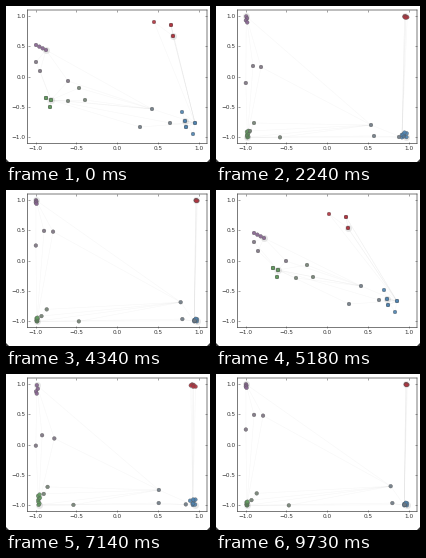
Recreate the animation shown at these times as a matplotlib script. Size 204 by 156 pixels, loop 9.8 s.

```python
import numpy as np
import matplotlib.pyplot as plt
from matplotlib.animation import FuncAnimation
from matplotlib.collections import LineCollection
from matplotlib.patches import Polygon

W, H, DPI = 204, 156, 100
PX = 72 / DPI                      # points per pixel
FRAMES, STEP = 140, 70
RESTART, SHIFT = 64, 78            # second training run, in frames
KEYS = [-14, -4, 0, 32, 61]        # start, early, middle, dip, end of a run
LEFT, RIGHT, TOP, BOTTOM = 21.5, 201, 4, 137.5
CENTER = np.array([LEFT + RIGHT, TOP + BOTTOM]) / 2
UNIT = np.array([RIGHT - LEFT, TOP - BOTTOM]) / 2.2

rng = np.random.default_rng(4)
paths, colors, edges = [], [], []


def latent(px):
    """Pixel position to the value that tanh squashes into the axes."""
    data = (np.asarray(px, float) - CENTER) / UNIT
    return np.arctanh(np.clip(data, -0.998, 0.998))


def add_node(color, early, middle, dip, end):
    paths.append([0.45 * early, early, middle, dip, end])
    colors.append(color)
    return len(paths) - 1


def cluster(color, count, spots, drift, corner, spread):
    """Nodes that start on shared spots and gather near a corner."""
    nodes = []
    for i in range(count):
        spot = np.array(spots[i % len(spots)])
        offset = np.array(spread) * (rng.random(), (i + 0.2) / count)
        nodes.append(add_node(color, latent(spot + drift), latent(spot),
                              latent(corner + offset),
                              latent(corner + 0.6 * offset)))
    return nodes


def wanderers(color, drift, rise, pairs):
    """Nodes torn between clusters; each pair is a middle and a dip position."""
    return [add_node(color, latent(np.add(middle, drift)), latent(middle),
                     latent(dip), latent(dip) + rise)
            for middle, dip in pairs]


red = cluster("#b03540", 5, [(167, 30), (165, 19), (148, 16)],
              (-35, 8), (191.5, 10), (-3, 2))
purple = cluster("#86648f", 4, np.linspace((40, 44), (30, 39), 4),
                 (8, 4), (29.5, 10), (2, 8))
green = cluster("#639a60", 8, [(45, 94), (40, 92), (44, 101)],
                (17, -14), (30, 132), (2.5, -8))
blue = cluster("#4f83b0", 8, [(189, 117), (179, 115), (180, 121),
                              (187, 128), (176, 106)],
               (-8, -6), (191.5, 132), (-6, -6))

upper = wanderers("#7d7482", (8, -4), (0.07, 0.36),
                  [((30, 56), (29, 77)), ((34, 65), (37, 60)),
                   ((62, 75), (45, 61))])
lower = wanderers("#738073", (18, -7), (0.15, -0.1),
                  [((62, 95), (38, 117)), ((73, 82), (34, 125)),
                   ((79, 94), (64, 132))])
right = wanderers("#6f7a84", (-1, -7), (0.44, 0.25),
                  [((146, 103), (155, 119)), ((134, 121), (158, 130)),
                   ((164, 117), (183, 131))])

# Each group is tied to its hubs
bridge = right[0]
for group, hubs in [(red, [red[0], blue[0]]), (purple, [purple[0]]),
                    (green, green[:2]), (blue, blue[:2]),
                    (upper, [purple[0], green[0]]),
                    (lower, [green[0], bridge]),
                    (right, [blue[0], green[0]]),
                    ([purple[0], upper[-1]], [bridge])]:
    edges += [(node, hub) for hub in hubs for node in group if node != hub]

paths = np.array(paths)
edges = np.array(edges)
labeled = [red[0], purple[0], green[0], blue[1]]


def positions(frame):
    u = frame if frame < RESTART else frame - SHIFT
    if u > 36 and frame % 3 == 0:      # late updates skip every third frame
        u -= 1
    u = min(u, KEYS[-1])
    i = min(np.searchsorted(KEYS, u, side="right"), len(KEYS) - 1) - 1
    k = (u - KEYS[i]) / (KEYS[i + 1] - KEYS[i])
    if i == 3:
        k **= 0.6                      # settle quickly after the dip
    return np.tanh(paths[:, i] + k * (paths[:, i + 1] - paths[:, i]))


plt.rcParams["font.family"] = "DejaVu Sans"
fig = plt.figure(figsize=(W / DPI, H / DPI), dpi=DPI, facecolor="white")
ax = fig.add_axes([LEFT / W, 1 - BOTTOM / H,
                   (RIGHT - LEFT) / W, (BOTTOM - TOP) / H])
ax.set(xlim=(-1.1, 1.1), ylim=(-1.1, 1.1))
ticks = np.linspace(-1, 1, 5)
names = [f"{t:.1f}".replace("-", "\u2212") for t in ticks]
ax.set_xticks(ticks, names)
ax.set_yticks(ticks, names)
ax.tick_params(direction="in", top=True, right=True, length=2 * PX,
               width=0.5 * PX, pad=2 * PX, labelsize=5.8 * PX,
               color="#444444", labelcolor="#333333")
for spine in ax.spines.values():
    spine.set(linewidth=0.7 * PX, color="#444444", snap=False)

# Dark notches of the rounded window corners
for x, d in ((0, 3), (W, -3)):
    fig.add_artist(Polygon([(x / W, 0), ((x + d) / W, 0), (x / W, 3 / H)],
                           color="#333333", lw=0))

start = positions(0)
lines = LineCollection(start[edges], colors="#707070", alpha=0.06,
                       linewidths=0.5 * PX, zorder=1)
ax.add_collection(lines)
halo = ax.scatter(*start[labeled].T, s=(7 * PX) ** 2, c="#9a9a9a", alpha=0.22,
                  linewidths=0, zorder=2, clip_on=False)
dots = ax.scatter(*start.T, s=(3.7 * PX) ** 2, c=colors, alpha=0.92,
                  edgecolors="#555555", linewidths=0.35 * PX, zorder=3,
                  clip_on=False)


def draw(frame):
    pos = positions(frame)
    lines.set_segments(pos[edges])
    halo.set_offsets(pos[labeled])
    dots.set_offsets(pos)
    return lines, halo, dots


anim = FuncAnimation(fig, draw, frames=FRAMES, interval=STEP, repeat=True,
                     repeat_delay=0, blit=False)
plt.show()
```
